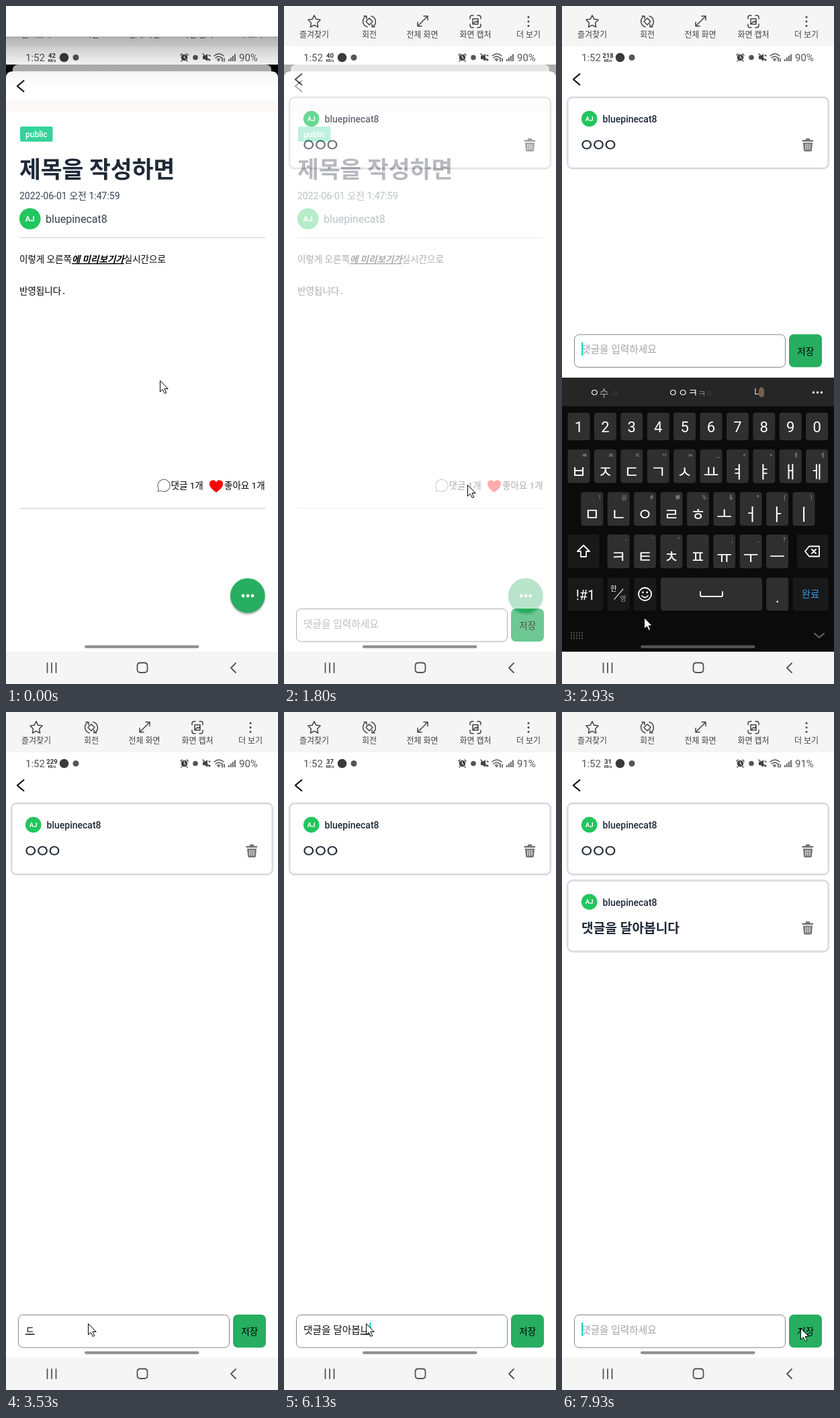
These frames come from a looping animation (405 px wide and 1007 px high, 8 s). An HTML page:

```html
<!DOCTYPE html>
<html lang="ko">
<head>
<meta charset="utf-8">
<title>Comment screen</title>
<style>
html, body { margin: 0; width: 100%; height: 100%; overflow: hidden; background: #fff; }
svg { display: block; width: 405px; height: 1007px; }
text { font-family: Roboto, "Noto Sans CJK KR", sans-serif; white-space: pre; }
.line { fill: none; stroke: #444; stroke-width: 1.5; stroke-linecap: round; stroke-linejoin: round; }
.mid { text-anchor: middle; }
</style>
</head>
<body>
<svg id="stage" viewBox="0 0 405 1007"></svg>
<script>
const LOOP = 8000, USER = 'bluepinecat8';
const GREEN = '#27ae60', INK = '#1f2937';

const text = (x, y, size, fill, str, extra = '') =>
  `<text x="${x}" y="${y}" font-size="${size}" fill="${fill}" ${extra}>${str}</text>`;
const rect = (x, y, w, h, fill, r = 0, extra = '') =>
  `<rect x="${x}" y="${y}" width="${w}" height="${h}" rx="${r}" fill="${fill}" ${extra}/>`;
const dot = (x, y, r, fill) => `<circle cx="${x}" cy="${y}" r="${r}" fill="${fill}"/>`;
const line = (d, extra = '') => `<path class="line" d="${d}" ${extra}/>`;
const dots = (x, y, gap, r, fill) => [-1, 0, 1].map(i => dot(x + i * gap, y, r, fill)).join('');
const group = (id, content) => `<g id="${id}">${content}</g>`;
const escapeChar = c => ({ '<': '&lt;', '&': '&amp;' })[c] || c;
const avatar = (x, y, r, size) => dot(x, y, r, '#22c55e') +
  text(x, y + size * .36, size, '#fff', 'AJ', 'class="mid" font-weight="700"');
const backArrow = y => line(`M27 ${y - 8.5}L16.8 ${y}L27 ${y + 8.5}`, 'style="stroke:#000;stroke-width:2;stroke-linecap:butt"');

function toolbar() {
  const labels = [[45, '즐겨찾기'], [127, '회전'], [206, '전체 화면'], [285, '화면 캡처'], [364, '더 보기']];
  let star = '';
  for (let i = 0; i < 10; i++) {
    const a = i * Math.PI / 5, r = i % 2 ? 4.8 : 9.6;
    star += `${i ? 'L' : 'M'}${45 + r * Math.sin(a)} ${23.5 - r * Math.cos(a)}`;
  }
  return rect(0, 0, 405, 60, '#f5f5f5') +
    line(star + 'Z') +
    line('M124 31A8.5 8.5 0 0 1 121 16M119 15h4v4M130 15A8.5 8.5 0 0 1 133 30M135 31h-4v-4M127 18l5 5-5 5-5-5Z') +
    line('M199 30L214 15M208 15h6v6M199 24v6h6') +
    line('M277 19v-2q0-3 3-3h2M288 14h2q3 0 3 3v2M293 27v2q0 3-3 3h-2M282 32h-2q-3 0-3-3v-2M281 19h8v8h-8ZM282 26l3-3 2 1 2-3') +
    [16.5, 23, 29.5].map(y => dot(364, y, 1.5, '#444')).join('') +
    labels.map(([x, s]) => text(x, 46.5, 12, '#444', s, 'class="mid"')).join('');
}

function statusBar() {
  const gray = '#555', tiny = 'class="mid" font-weight="700"';
  return text(29, 81.5, 15, gray, '1:52') +
    text(68.5, 77, 9.5, '#333', '', tiny + ' id="speed"') +
    text(68.5, 83, 5.5, '#333', 'KB/s', tiny) +
    dot(86.5, 76.5, 6.8, '#3a3a3a') + dot(104, 76.5, 4.5, gray) +
    dot(265.5, 76.5, 4.8, '#444') +
    line('M260 73l2-2M271 73l-2-2M261 82l1-1M270 82l-1-1') +
    line('M265.5 74v3l2 1', 'style="stroke:#fff;stroke-width:1"') +
    dot(282, 76.5, 3.8, gray) +
    '<path d="M293 74h3l4-3v11l-4-3h-3Z" fill="#444"/>' +
    line('M293 71l10 10M302 73l2 1M302 79l2 1') +
    line('M310 74q7-6 14 0M312 77q5-4 9 0M314.5 79.5q2-2 4 0', `style="stroke:${gray}"`) +
    dot(316.5, 81, 1.2, gray) + line('M322 77v5M325 82v-4') +
    [0, 1, 2, 3].map(i => rect(331 + i * 3, 79 - i * 2.5, 1.8, 3 + i * 2.5, gray)).join('') +
    text(347, 81.5, 15, gray, '', 'id="battery"');
}

function postScreen() {
  const rule = y => rect(20, y, 366, 1.3, '#d4d4d4');
  return rect(0, 60, 405, 899, '#fff') + rect(0, 87, 405, 30, '#000') +
    '<path d="M10 97V95q0-8 9-8H386q9 0 9 8v2Z" fill="#b4b4b4"/>' +
    '<path d="M0 959V107q0-10 10-10H395q10 0 10 10V959Z" fill="#fff"/>' +
    backArrow(119) + rect(0, 141, 405, 17, '#fbf8f8') +
    rect(21, 179, 48.5, 22.5, '#34d399', 2.5) +
    text(45.3, 194.5, 12, '#fff', 'public', 'class="mid" font-weight="500"') +
    text(20, 255, 34.6, INK, '제목을 작성하면', 'font-weight="700"') +
    text(20, 287, 14, '#374151', '2022-06-01 오전 1:47:59') +
    avatar(35.7, 316, 15.8, 11.5) + text(59, 322, 16, '#374151', USER) + rule(343.3) +
    text(20, 381, 13.5, '#000', '이렇게 오른쪽<tspan font-weight="700" font-style="italic" text-decoration="underline">에 미리보기가</tspan>실시간으로') +
    text(20, 428, 13.5, '#000', '반영됩니다<tspan font-family="Noto Sans Mono, monospace">.</tspan>') +
    group('reply',
      line('M226 721l1.3-4.2A9 9 0 1 1 230.5 720Z', 'style="stroke:#777;stroke-width:1.2"') +
      text(245.5, 717, 13.5, '#000', '댓글 1개')) +
    '<path d="M313 722.5c-3-2.2-10-7-10-12.5a5.2 5.2 0 0 1 10-2.500 5.200 5.200 0 0 1 10 2.500c0 5.500-7 10.300-10 12.500Z" fill="#f00"/>' +
    text(325, 717, 13.5, '#000', '좋아요 1개') + rule(745.7) +
    `<circle cx="359.8" cy="875.7" r="25.8" fill="${GREEN}" style="filter:drop-shadow(0 2px 1.5px #0005)"/>` +
    dots(360, 876, 7, 2.4, '#fff');
}

function card(y, comment) {
  return rect(8.5, y, 388, 105, '#fff', 7, 'stroke="#d7d7de" stroke-width="1.8" style="filter:drop-shadow(0 0 1px #0003)"') +
    avatar(40.7, y + 31.5, 11.8, 9.5) +
    text(60.5, y + 37, 14, INK, USER, 'font-weight="500"') + comment +
    `<path d="M357.5 ${y + 63}h5l1-2.5h5l1 2.5h4.5v2.5h-16.5ZM359 ${y + 67}h14l-1 11q0 2-2 2h-8q-2 0-2-2Z" fill="#757575"/>` +
    line(`M363 ${y + 69}v8M366 ${y + 69}v8M369 ${y + 69}v8`, 'style="stroke:#fff;stroke-width:1.1"');
}

function commentScreen() {
  return rect(0, 60, 405, 899, '#fff') + backArrow(109) +
    card(136, text(24.8, 215.5, 26, INK, 'ㅇㅇㅇ', 'letter-spacing="-6.3"')) +
    group('newCard', card(250.5, text(29, 328, 19.2, INK, '댓글을 달아봅니다', 'font-weight="700"'))) +
    group('inputRow',
      rect(18.5, 895.5, 314, 48.5, '#fff', 7, 'stroke="#858585"') +
      text(29, 922.5, 14.7, '#a3a3a3', '댓글을 입력하세요', 'id="hint"') +
      text(29, 922.5, 14.7, '#111', '', 'id="typed"') +
      rect(0, 907, 2.4, 20, '#1fd8cf', 0, 'id="caret"') +
      group('save', rect(338, 895, 49, 49, GREEN, 7) +
        text(362.7, 925, 13.5, '#000', '저장', 'class="mid"')));
}

function keyboard() {
  const KEY = '#2f2f2f', DARK = '#191919', PITCH = 39.4, white = 'style="stroke:#fff;stroke-width:1.8"';
  const key = (x, y, w, h, fill, label = '', size = 22, drop = 8) =>
    rect(x, y, w, h, fill, 4) +
    text(x + w / 2, y + h / 2 + drop, size, '#fff', label, 'class="mid"');
  const letterRow = (x, y, letters, hints) => [...letters].map((c, i) =>
    key(x + i * PITCH, y, 33, 50, KEY, c, 25, 17) +
    text(x + i * PITCH + 29, y + 11, 8.5, '#999', escapeChar(hints[i]), 'text-anchor="end"')).join('');
  return rect(0, 552, 405, 407, '#0b0b0b') + rect(0, 552, 405, 42.5, '#262626') +
    text(41, 579.5, 16, '#eee', 'ㅇ<tspan fill="#aaa" font-size="15">수</tspan> <tspan fill="#444" font-size="11">ㅇ</tspan>') +
    text(158, 579.5, 16, '#eee', 'ㅇㅇㅋ<tspan fill="#888" font-size="13">ㅋ</tspan><tspan fill="#444" font-size="11">ㅇ</tspan>') +
    text(286, 579, 15, '#ddd', '나') + rect(293, 567, 8, 14, '#765f4a', 4) +
    dots(380.5, 574, 6, 1.8, '#eee') +
    [...'1234567890'].map((c, i) => key(8.5 + i * PITCH, 604, 33, 41, KEY, c)).join('') +
    letterRow(8.5, 658.5, 'ㅂㅈㄷㄱㅅㅛㅕㅑㅐㅔ', 'ㅃㅉㄸㄲㅆ_<>ㅒㅖ') +
    letterRow(28.3, 722, 'ㅁㄴㅇㄹㅎㅗㅓㅏㅣ', '!@#₩%&*()') +
    letterRow(67.6, 785, 'ㅋㅌㅊㅍㅠㅜㅡ', `-'":;,?`) +
    key(8.5, 785, 47, 50, DARK) + line('M32 801l9 9h-5v8h-8v-8h-5Z', white) +
    key(349.5, 785, 47, 50, DARK) + line('M362 810l6-7.5h15v15h-15ZM372 807l6 6M378 807l-6 6', white) +
    key(8.5, 849, 53, 49, DARK, '!#1', 20) +
    key(67.6, 849, 33, 49, DARK) + text(72, 869, 10.5, '#fff', '한') + text(86, 884, 10.5, '#999', '영') +
    line('M78 881L91 866', 'style="stroke:#ccc;stroke-width:1.2"') +
    key(107, 849, 33, 49, DARK) + line('M133 873.5a9.5 9.5 0 1 1-19 0a9.5 9.5 0 1 1 19 0M119 876q4.5 5 9 0', white) +
    dot(120.3, 871, 1.4, '#fff') + dot(126.7, 871, 1.4, '#fff') +
    key(147, 849, 151, 49, KEY) + line('M206 870v5q0 2 2 2h29q2 0 2-2v-5', white) +
    key(304.3, 849, 33, 49, KEY, '.', 24, 12) +
    key(343.7, 849, 53, 49, DARK) + text(370, 879, 14.5, '#3c96d8', '완료', 'class="mid"') +
    line('M13 931h19M13 935h19M13 939h19', 'style="stroke:#484848;stroke-width:2.4;stroke-dasharray:2 2;stroke-linecap:butt"') +
    line('M376 932l7 6 7-6', 'style="stroke:#555;stroke-width:2.4"');
}

function navBar() {
  return rect(117, 949.5, 170.5, 4.2, '#8f8f8f', 2.1, 'id="pill"') + rect(0, 959, 405, 48, '#f5f5f5') +
    line('M61.5 976v14M68 976v14M74.5 976v14M200 975.5h6q4.500 0 4.500 4.500v5.500q0 4.500-4.500 4.500h-6q-4.500 0-4.500-4.500v-5.500q0-4.500 4.500-4.500ZM342 976l-7 7 7 7',
      'style="stroke:#555;stroke-width:1.8"');
}

const stage = document.getElementById('stage');
stage.innerHTML = `
  <defs>
    <clipPath id="screen"><rect y="60" width="405" height="899"/></clipPath>
    <linearGradient id="shade" x2="0" y2="1">
      <stop offset="0" stop-opacity=".27"/><stop offset=".5" stop-opacity=".07"/><stop offset="1" stop-opacity="0"/>
    </linearGradient>
  </defs>
  ${rect(0, 0, 405, 1007, '#fff')}
  <g clip-path="url(#screen)">
    ${group('post', postScreen())}${group('comments', commentScreen())}
    ${statusBar()}${group('keys', keyboard())}
  </g>
  ${navBar()}${toolbar()}
  ${group('cover', rect(0, -60, 405, 106, '#fff') + rect(0, 46, 405, 75, 'url(#shade)') + rect(0, 45.5, 405, 1, '#999'))}
  <path id="pointer" d="M0 0V16.5L3.8 13L6.8 19L9.3 17.8L6.5 12H11.7Z" fill="#fff" stroke="#000" stroke-linejoin="round"/>`;

const ui = Object.fromEntries([...stage.querySelectorAll('[id]')].map(node => [node.id, node]));

// Each entry is [start time, value]; a value holds until the next start.
const speeds = [[0, 42], [600, 40], [1900, 218], [3300, 229], [4100, 52], [4800, 44], [5700, 37], [6800, 31]];
const typing = [[0, ''], [3030, 'ㄷ'], [3670, '대'], [3900, '댓'], [4300, '댓ㄱ'], [4530, '댓그'], [4600, '댓글'],
  [4700, '댓글ㅇ'], [4800, '댓글으'], [4870, '댓글을'], [4930, '댓글을 '], [5000, '댓글을 ㄷ'], [5070, '댓글을 다'],
  [5130, '댓글을 달'], [5270, '댓글을 달ㅇ'], [5330, '댓글을 달아'], [5470, '댓글을 달아ㅂ'], [5600, '댓글을 달아보'],
  [5720, '댓글을 달아봅'], [5900, '댓글을 달아봅ㄴ'], [6000, '댓글을 달아봅니'], [6330, '댓글을 달아봅니ㄷ'],
  [6450, '댓글을 달아봅니다'], [7600, '']];
const pointerPath = [[70, 229, 556], [800, 266, 721], [930, 266, 721], [1250, 273, 711], [2050, 273, 711],
  [2480, 122, 908], [6600, 122, 908], [7060, 355, 915]];

const between = (t, from, to) => t >= from && t < to;
const current = (steps, t) => steps.findLast(step => t >= step[0]);
const ease = (t, from, to) => {
  const p = Math.min(1, Math.max(0, (t - from) / (to - from)));
  return p * p * (3 - 2 * p);
};
const show = (node, visible) => node.setAttribute('visibility', visible ? 'visible' : 'hidden');
const shift = (node, x, y) => node.setAttribute('transform', `translate(${x} ${y})`);

function drawInput(t) {
  const [since, value] = current(typing, t);
  const start = Math.max(since, 2550);
  const composing = value && !value.endsWith(' ') ? value.slice(-1) : '';
  ui.typed.innerHTML = value.slice(0, value.length - composing.length) +
    (composing && `<tspan text-decoration="underline">${composing}</tspan>`);
  show(ui.hint, !value);
  show(ui.caret, t >= 2550 && (t - start) % 1000 < 500);
  ui.caret.setAttribute('x', 29 + (value ? ui.typed.getComputedTextLength() : 0));
  shift(ui.inputRow, 0, between(t, 2730, 3060) ? -407.5 : 0);
}

function render(t) {
  shift(ui.cover, 0, -130 * ease(t, 930, 1130));
  ui.reply.setAttribute('opacity', between(t, 1400, 1620) ? .2 : 1);
  ui.save.setAttribute('opacity', between(t, 7220, 7400) ? .2 : 1);
  ui.comments.setAttribute('opacity', ease(t, 1640, 1900));
  show(ui.newCard, t >= 7600);

  const raised = ease(t, 2670, 2870) - ease(t, 3060, 3260);
  shift(ui.keys, 0, 407 * (1 - raised));
  ui.pill.setAttribute('fill', raised > .1 ? '#555' : '#8f8f8f');

  drawInput(t);
  ui.speed.textContent = current(speeds, t)[1];
  ui.battery.textContent = t < 4100 ? '90%' : '91%';

  const i = Math.max(0, pointerPath.findLastIndex(p => t >= p[0]));
  const [from, x, y] = pointerPath[i];
  const [to, nextX, nextY] = pointerPath[i + 1] || [from + 1, x, y];
  const p = ease(t, from, to);
  shift(ui.pointer, x + (nextX - x) * p + .5, y + (nextY - y) * p + .5);
}

function tick() {
  render(performance.now() % LOOP);
  requestAnimationFrame(tick);
}
tick();
</script>
</body>
</html>
```
